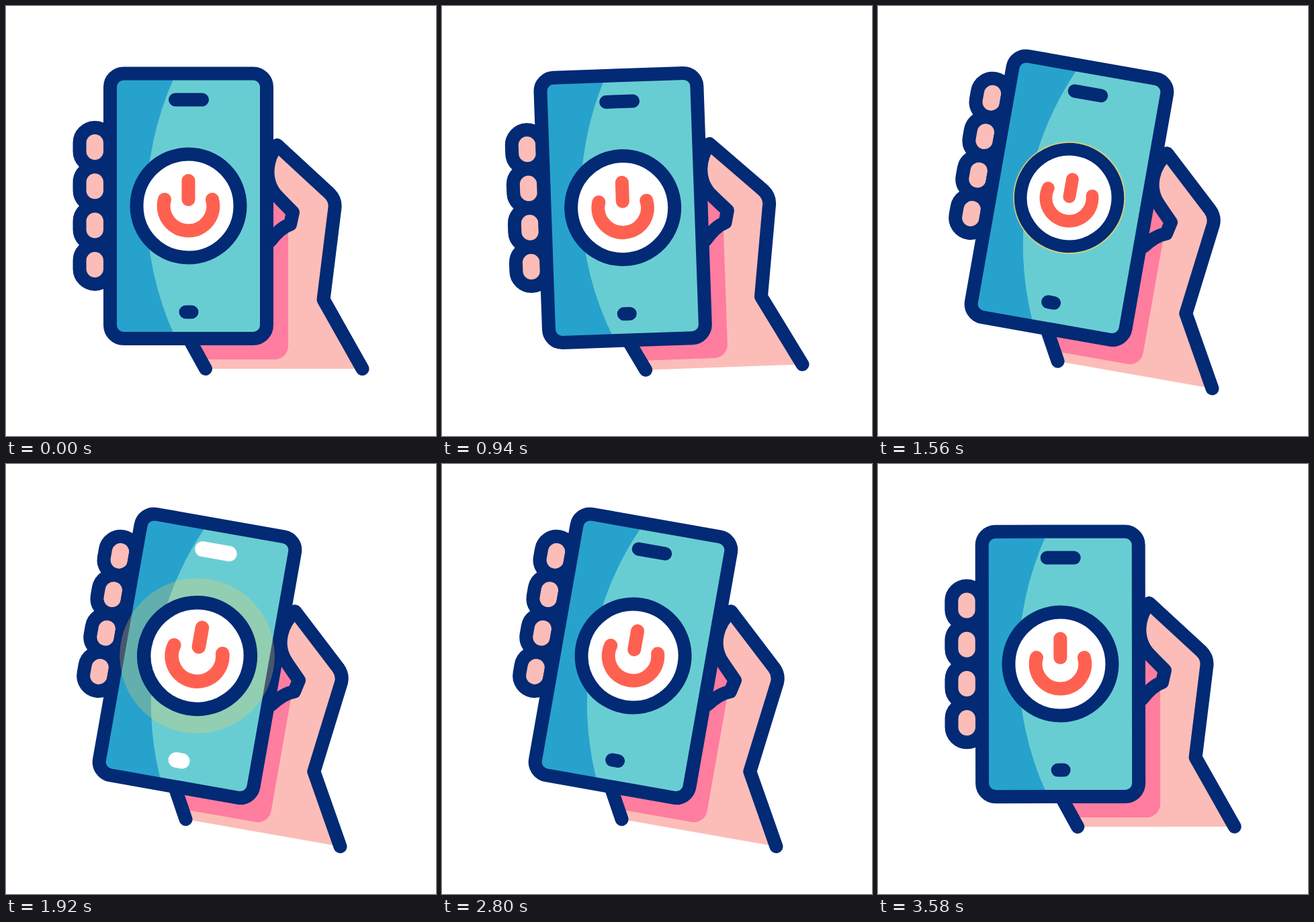
An HTML page that plays this animation: 640x640 px, repeating every 3600 ms.

```html
<!DOCTYPE html>
<html lang="en">
<head>
<meta charset="utf-8">
<title>Phone in hand</title>
<style>
  html, body { margin: 0; width: 100%; height: 100%; overflow: hidden; background: #fff; }
  svg { display: block; width: 100vw; height: 100vh; }
  .line { stroke: #022a75; stroke-width: 20; stroke-linecap: round; stroke-linejoin: round; }
  .power { stroke: #ff6150; }
  .skin { fill: #fcbdb8; }
  .open { fill: none; }
</style>
</head>
<body>
<svg viewBox="0 0 640 640">
  <defs>
    <path id="slots" d="M252 139.5H292M267.5 455.5H276.5"/>
    <rect id="finger" class="line skin" x="109.5" y="181" width="45.5" height="58" rx="22.75"/>
  </defs>
  <g id="device">
    <path class="skin" d="M404 207L482 279Q491 287 489.5 298L472.5 437L530.5 540H297L264 480L390 340V230Z"/>
    <path fill="#ff7d9f" d="M385 270L400 281L427 307L422 325L420 330V506A20 20 0 0 1 400 526H288L264 484Z"/>
    <path class="line open" d="M264 480L297 540M530.5 540L472.5 437L489.5 300Q490.5 288 481.5 279L403.5 207C386 230 385 259 400 279Q404 284 427 307L423 325Q408 330 393 350"/>
    <g id="fingers">
      <use href="#finger"/>
      <use href="#finger" y="58.3"/>
      <use href="#finger" y="116.6"/>
      <use href="#finger" y="174.9"/>
    </g>
    <rect x="155" y="100.5" width="233" height="394.5" rx="20" fill="#68cdd2"/>
    <path fill="#27a2cd" d="M160 106H250.5A465 465 0 0 0 250.5 490H160Z"/>
    <rect class="line open" x="155" y="100.5" width="233" height="394.5" rx="20"/>
    <use href="#slots" class="line"/>
    <use href="#slots" class="line" id="glow" style="stroke:#fff"/>
    <g transform="translate(271.5 297.5)">
      <circle id="wave" fill="#ffd15c"/>
      <g id="button">
        <circle class="line" r="77" fill="#fff"/>
        <path class="line open power" d="M-35.5 -9.5A36.8 36.8 0 1 0 35.5 -9.5"/>
        <path id="bar" class="line power" d="M0 -37.5V-9.5"/>
      </g>
    </g>
  </g>
</svg>
<script>
  const LOOP = 3.6;
  const [device, fingers, glow, wave, button, bar] =
    ['device', 'fingers', 'glow', 'wave', 'button', 'bar'].map(id => document.getElementById(id));

  // Eased rise from 0 to 1 between two times in seconds.
  function ramp(t, start, end) {
    const s = Math.min(1, Math.max(0, (t - start) / (end - start)));
    return s * s * (3 - 2 * s);
  }

  function draw(now) {
    const t = now / 1000 % LOOP;

    const left = ramp(t, 0, .43), right = ramp(t, .765, 1.1);
    const leftAgain = ramp(t, 2.833, 3.217), rest = ramp(t, 3.217, LOOP);
    const angle = -16 * left + 26 * right - 20 * leftAgain + 10 * rest;
    const slide = 36 * left - 75 * right + 61.5 * leftAgain - 22.5 * rest;
    device.setAttribute('transform', `rotate(${angle} 346.5 366)`);
    fingers.setAttribute('transform', `translate(0 ${slide})`);

    const scale = 1 - .062 * ramp(t, 1.1, 1.53) + .12 * ramp(t, 1.53, 2.1) - .058 * ramp(t, 2.1, 2.8);
    button.setAttribute('transform', `scale(${scale})`);
    bar.setAttribute('transform', `translate(0 ${(1 - scale) * 125})`);

    const light = ramp(t, 1.57, 1.75) - ramp(t, 2.45, 2.8);
    glow.style.opacity = light;
    glow.style.strokeWidth = 20 + 3 * light;

    const spread = ramp(t, 1.52, 2.2);
    wave.setAttribute('r', 83 + 51 * spread);
    wave.style.opacity = t < 1.52 ? 0 : .75 * (1 - spread);

    requestAnimationFrame(draw);
  }
  requestAnimationFrame(draw);
</script>
</body>
</html>
```
